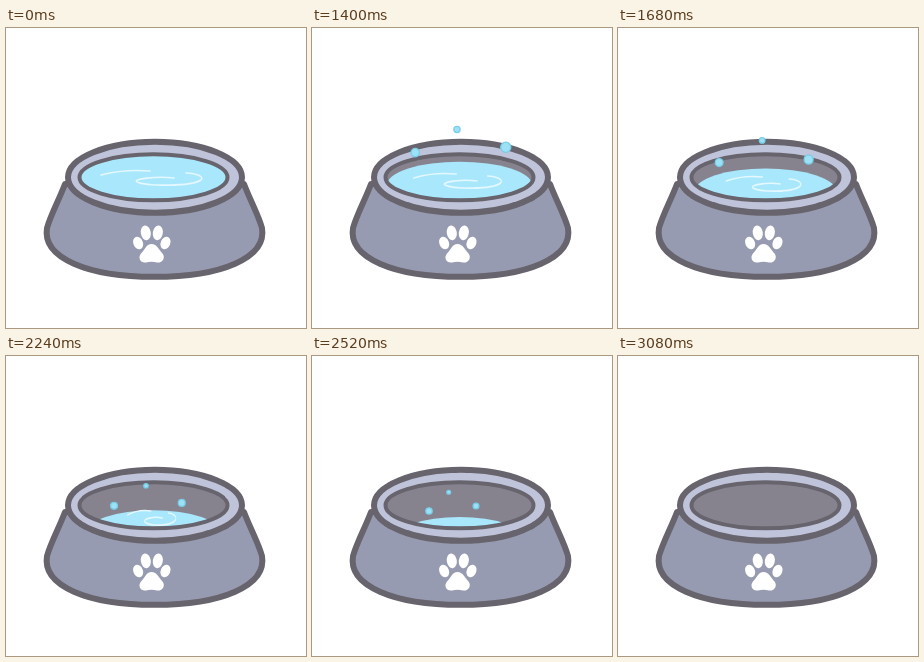
Write an HTML page that moves like this. It is 300x300 px and loops after 5.32 s.

```html
<!DOCTYPE html>
<html lang="en">
<head>
<meta charset="utf-8">
<title>Water bowl</title>
<style>
  html, body { margin: 0; width: 100%; height: 100%; overflow: hidden; background: #fff; }
  svg { display: block; width: 100vw; height: 100vh; }
  .line { stroke: #68646d; }
  .swirl { fill: none; stroke: #e4f8ff; stroke-width: 1.6; stroke-linecap: round; }
  .drop { fill: #9be2f6; stroke: #78cde8; stroke-width: 1.3; }
</style>
</head>
<body>
<svg viewBox="0 0 300 300">
  <defs>
    <clipPath id="well"><ellipse cx="147.5" cy="149.3" rx="74" ry="23"/></clipPath>
    <g id="toes">
      <ellipse cx="-13.7" cy="215" rx="4.8" ry="6.5" transform="rotate(-22 -13.7 215)"/>
      <ellipse cx="-6" cy="204.8" rx="5" ry="7.4" transform="rotate(-8 -6 204.8)"/>
    </g>
  </defs>

  <path class="line" fill="#979bb1" stroke-width="6" stroke-linejoin="round"
    d="M59 156C53 172 45 186 41 200C36 230 82 248.8 148.5 248.8S261 230 256 200C252 186 244 172 238 156Z"/>
  <ellipse class="line" cx="149" cy="149.3" rx="87" ry="35.5" fill="#bfc4da" stroke-width="6"/>
  <ellipse cx="147.5" cy="149.3" rx="74" ry="23" fill="#86838f"/>

  <g clip-path="url(#well)">
    <ellipse id="water" cx="147.5" ry="23" fill="#a9e7fc"/>
    <g id="swirl" class="swirl">
      <path d="M95 147Q118 141 144 143"/>
      <path d="M168 150C150 148 126 151 131 154C140 158 185 159 195 152C199 148 188 145 180 145"/>
    </g>
  </g>
  <ellipse class="line" cx="147.5" cy="149.3" rx="74" ry="23" fill="none" stroke-width="4"/>

  <g fill="#fff">
    <use href="#toes" transform="translate(145.8 0)"/>
    <use href="#toes" transform="translate(145.8 0) scale(-1 1)"/>
    <path d="M145.5 216C151 216 153 222 156.5 225.5C160 230 156 235.5 151 234.5Q145.5 233 140 234.5C134.5 235.5 131.5 229.5 135 225.5C139 222 140 216 145.5 216Z"/>
  </g>
  <g id="drops">
    <circle id="speck" class="drop" cx="88.5" cy="91.5" r="2.4"/>
  </g>
</svg>

<script>
  const LOOP = 5320, START = 1120, STEP = 280, EMPTY = 7;
  const get = id => document.getElementById(id);
  const water = get('water'), swirl = get('swirl'), speck = get('speck');

  const set = (el, attrs) => Object.entries(attrs).forEach(([k, v]) => el.setAttribute(k, v));
  const show = (el, on) => set(el, { visibility: on ? 'visible' : 'hidden' });
  const lerp = (a, b, u) => a + (b - a) * u;
  const bend = (a, b, c, u) => lerp(lerp(a, b, u), lerp(b, c, u), u);

  // Each drop follows a curve: start, control and end point, start and end radius
  const drops = [
    { x: [109, 90, 117], y: [113, 144, 155], r: [4.4, 3.2] },
    { x: [145, 146, 136.7], y: [89, 122, 136.2], r: [3.4, 1.9] },
    { x: [194, 197, 164], y: [104, 146, 150], r: [5.6, 2.9] }
  ];
  for (const drop of drops) {
    drop.el = document.createElementNS('http://www.w3.org/2000/svg', 'circle');
    set(drop.el, { class: 'drop' });
    get('drops').append(drop.el);
  }

  function draw(step) {
    const level = Math.max(0, step);
    const wet = level < EMPTY;

    set(water, { cy: 150 + 6.8 * level, rx: 74 - 1.5 * level });
    show(water, wet);

    set(swirl, { transform: `translate(146 ${3 * level}) scale(${1 - 0.13 * level} 1) translate(-146 0)` });
    show(swirl, level < 5);

    const u = level / 5;
    for (const { el, x, y, r } of drops) {
      set(el, { cx: bend(...x, u), cy: bend(...y, u), r: lerp(...r, u) });
      show(el, step >= 0 && wet);
    }
    show(speck, step === 0);
  }

  const origin = performance.now();
  function tick() {
    const t = (performance.now() - origin) % LOOP;
    draw(t < START ? -1 : Math.min(EMPTY, Math.floor((t - START) / STEP)));
    requestAnimationFrame(tick);
  }
  tick();
</script>
</body>
</html>
```
